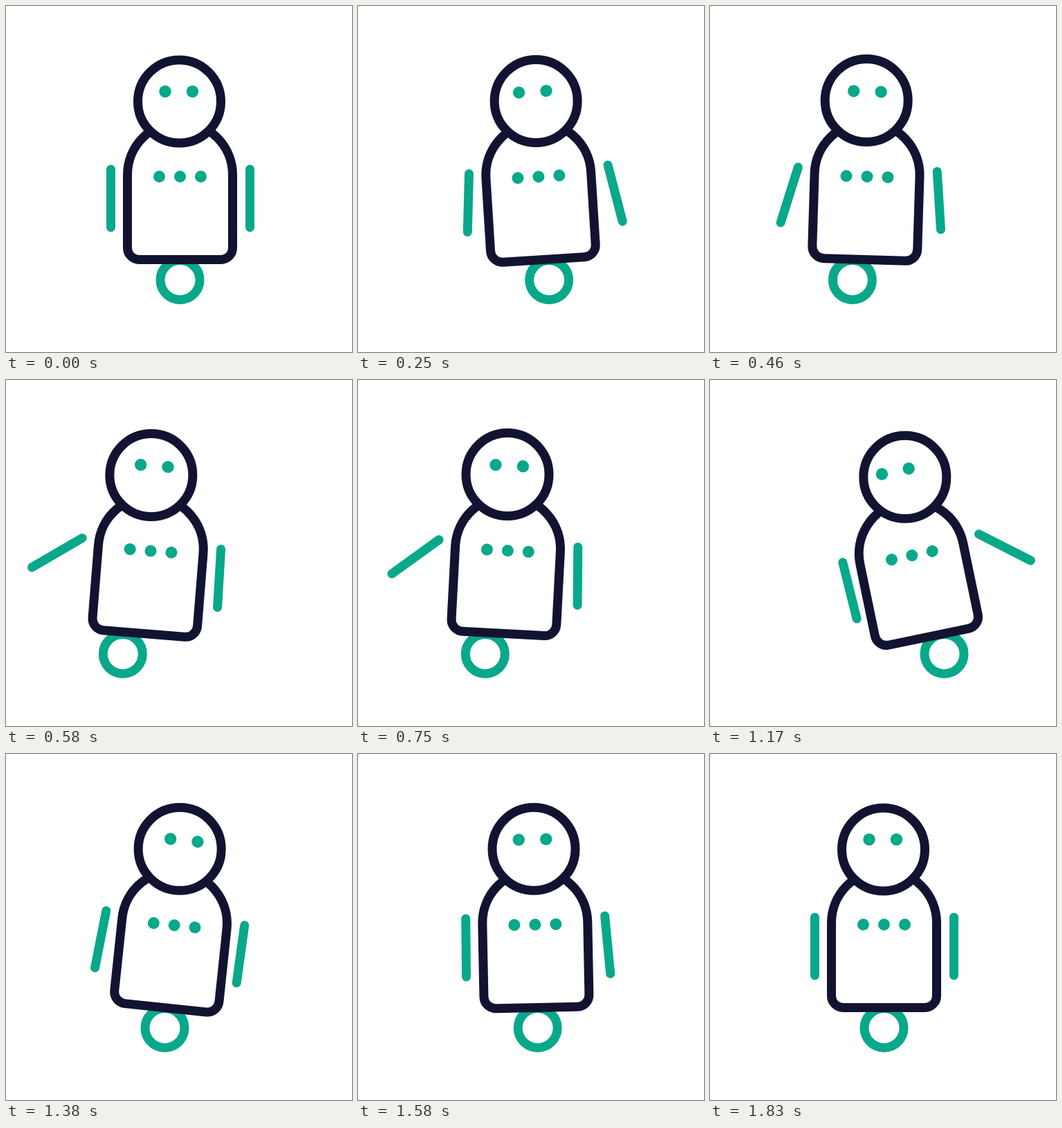
Animation, 500 px wide and 500 px high, one loop 1870 ms. Source, as an HTML page:

```html
<!DOCTYPE html>
<html lang="en">
<head>
<meta charset="utf-8">
<title>Rolling robot</title>
<style>
  html, body { margin: 0; width: 100%; height: 100%; overflow: hidden; background: #fff; }
  svg { display: block; width: 100%; height: 100%; }
  .line { fill: #fff; stroke: #121331; stroke-width: 13; }
  .limb { fill: none; stroke: #08a88a; stroke-width: 13; stroke-linecap: round; }
  .dot { fill: #08a88a; }
</style>
</head>
<body>
<svg viewBox="0 0 500 500">
  <circle id="wheel" class="limb" cx="251.5" cy="396" r="28.5"/>
  <g id="torso">
    <path class="line" d="M175.5 244a76 76 0 0 1 152 0V349.5a17 17 0 0 1 -17 17H192.5a17 17 0 0 1 -17 -17Z"/>
    <g class="dot">
      <circle cx="221.5" cy="246.5" r="8.5"/>
      <circle cx="251.5" cy="246.5" r="8.5"/>
      <circle cx="281.5" cy="246.5" r="8.5"/>
    </g>
    <path id="leftArm" class="limb" d="M151.5 236v84"/>
    <path id="rightArm" class="limb" d="M352.5 236v84"/>
  </g>
  <circle id="head" class="line" cx="250.5" cy="138" r="60"/>
  <g id="eyes" class="dot">
    <circle cx="230" cy="123.5" r="8.7"/>
    <circle cx="269.5" cy="123.5" r="8.7"/>
  </g>
</svg>
<script>
const LOOP = 1870, FPS = 24, LAST = 44;

// Steps at which each part reverses its swing
const trunkTurns = [4.5, 15.5, 27, 34, 39];
const leftTurns = [9, 15, 28, 34, 39];
const rightTurns = [5, 16, 28, 34, 39];

const ease = u => (1 - Math.cos(Math.PI * u)) / 2;

// Swings from rest through the given extremes and back to rest.
function swing(step, turns, extremes) {
  const times = [0, ...turns, LAST], values = [0, ...extremes, 0];
  const next = Math.max(1, times.findIndex(t => t >= step)), last = next - 1;
  const u = (step - times[last]) / (times[next] - times[last]);
  return values[last] + (values[next] - values[last]) * ease(u);
}

const place = (id, transform) =>
  document.getElementById(id).setAttribute("transform", transform);

function draw(time) {
  // Steps begin on rounded hundredths of a second.
  const step = Math.min(LAST, Math.floor((time % LOOP + 4) * FPS / 1000));
  const trunk = (...extremes) => swing(step, trunkTurns, extremes);

  const roll = at => swing(at, trunkTurns, [30, -88, 93, -28, 12]);
  const wheel = roll(step);
  const body = trunk(12, -45, 43, -11, 6);
  const head = trunk(9, -43, 33, -1, 4);
  const tilt = trunk(-4, 5, -12.7, 7, -2);
  const left = swing(step, leftTurns, [2, 64, -14, 13, -2]);
  const right = swing(step, rightTurns, [-15, 5, -63, 13, -7.5]);

  // Leaning sinks the body; speed lifts the head.
  const sink = Math.abs(tilt) ** 3 / 230;
  const speed = roll(Math.min(LAST, step + .5)) - roll(Math.max(0, step - .5));
  const lift = Math.abs(speed) / 10;

  place("wheel", `translate(${wheel} 0)`);
  place("torso", `translate(${body} ${sink}) rotate(${tilt} 251.5 246.5)`);
  place("head", `translate(${head} ${sink / 2 - lift})`);
  place("eyes", `translate(${head} ${sink}) rotate(${tilt} 250 189)`);
  place("leftArm", `rotate(${left - tilt} 151.5 236)`);
  place("rightArm", `rotate(${right - tilt} 352.5 236)`);
}

const start = performance.now();
function tick() {
  draw(performance.now() - start);
  requestAnimationFrame(tick);
}
tick();
</script>
</body>
</html>
```
